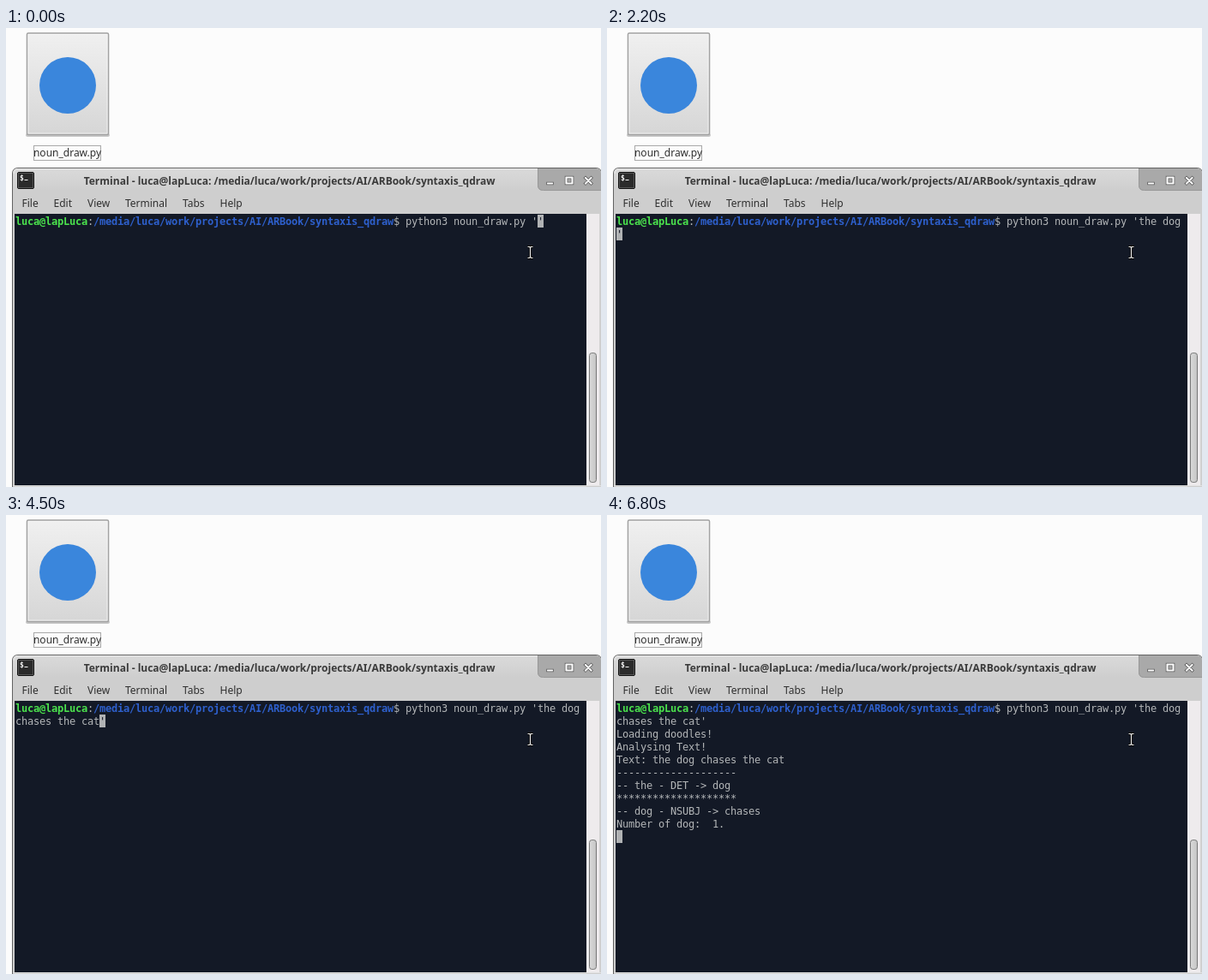
Recreate the animation shown at these times as an HTML page. Size 694x536 px, loop 8 s.

```html
<!DOCTYPE html>
<html lang="en">
<head>
<meta charset="utf-8">
<title>Terminal session</title>
<style>
  html, body { margin: 0; width: 100%; height: 100%; overflow: hidden; background: #fcfcfc; }
  svg { display: block; }
  .ui { font: 12px "Noto Sans", "Open Sans", sans-serif; fill: #303030; }
  .title { font-weight: bold; fill: #3a3a3a; }
  #screen { font: 12px "DejaVu Sans Mono", "Liberation Mono", monospace; fill: #b3b6b8; }
  #screen .user { font-weight: bold; fill: #4be34d; }
  #screen .path { font-weight: bold; fill: #2e60cd; }
  #screen .under { fill: #131926; }
</style>
</head>
<body>
<svg width="694" height="536" viewBox="0 0 694 536">
  <defs>
    <linearGradient id="paper" x1="0" y1="0" x2="0" y2="1">
      <stop offset="0" stop-color="#f0f0f0"/>
      <stop offset="1" stop-color="#d6d6d6"/>
    </linearGradient>
    <linearGradient id="bar" x1="0" y1="0" x2="0" y2="1">
      <stop offset="0" stop-color="#dadada"/>
      <stop offset="1" stop-color="#cecece"/>
    </linearGradient>
    <linearGradient id="thumb">
      <stop offset="0" stop-color="#dadada"/>
      <stop offset="1" stop-color="#c4c4c4"/>
    </linearGradient>
  </defs>

  <!-- desktop file -->
  <rect x="23" y="123" width="98" height="4" rx="2" fill="#a0a0a0" opacity=".6"/>
  <rect x="24.5" y="6" width="95" height="118.5" rx="1.5" fill="url(#paper)" stroke="#a2a2a2" stroke-width="1.6"/>
  <rect x="26" y="7.5" width="92" height="115.5" fill="none" stroke="#f8f8f8" opacity=".7"/>
  <circle cx="72" cy="67" r="33" fill="#3a86dc"/>
  <text class="ui" x="71.5" y="150" text-anchor="middle">noun_draw.py</text>
  <rect x="32.5" y="137.5" width="78" height="17" fill="none" stroke="#555" stroke-dasharray="1 1"/>

  <!-- window frame -->
  <path d="M7.5 540V170q0-6.500 6.500-6.500H688q6.500 0 6.500 6.500V540Z" fill="#cecece" stroke="#626262"/>
  <path d="M8 190V170q0-6 6-6H688q6 0 6 6v20Z" fill="url(#bar)"/>
  <path d="M9 170q0-5.500 5.500-5.500H620" fill="none" stroke="#ececec"/>
  <path d="M620 164H688q6 0 6 6v19.500H626q-6 0-6-6Z" fill="#a9a9a9"/>
  <path d="M620.500 164v19.500q0 6 6 6H694" fill="none" stroke="#979797"/>
  <g fill="none" stroke-linecap="square">
    <g stroke="#626262" stroke-width="3.600">
      <path id="glyphs" d="M632 181.500h5M653.500 174.500h7v7h-7ZM676 175l6.500 6.500M682.500 175l-6.500 6.500"/>
    </g>
    <use href="#glyphs" stroke="#fff" stroke-width="1.600"/>
    <path d="M632 181.500h5M653.500 174.500h7v7h-7ZM676 175l6.500 6.500M682.500 175l-6.500 6.500" stroke="#fff" stroke-width="1.700"/>
  </g>
  <rect x="13.500" y="168.500" width="19" height="19" rx="1.500" fill="#2b2b2b" stroke="#111"/>
  <rect x="14.500" y="169.500" width="17" height="17" fill="none" stroke="#555"/>
  <text x="16" y="178" font-family="DejaVu Sans Mono, monospace" font-size="8" font-weight="bold" fill="#f4f4f4">$</text>
  <path d="M21.500 177.500h4" stroke="#f4f4f4"/>
  <text class="ui title" x="570.500" y="183" text-anchor="end">Terminal - luca@lapLuca: /media/luca/work/projects/AI/ARBook/syntaxis_qdraw</text>
  <g class="ui">
    <text x="18.500" y="209">File</text>
    <text x="55.500" y="209">Edit</text>
    <text x="95" y="209">View</text>
    <text x="139" y="209">Terminal</text>
    <text x="206" y="209">Tabs</text>
    <text x="249.500" y="209">Help</text>
  </g>

  <!-- terminal body and scrollbar -->
  <rect x="10" y="217" width="667" height="317" fill="#131926"/>
  <rect x="677" y="217" width="15" height="317" fill="#eeebed"/>
  <path d="M692.500 217V534" stroke="#d2d2d2"/>
  <path d="M8 534.500H694" stroke="#e2e2e2"/>
  <rect x="680.500" y="379.500" width="8" height="151" rx="3" fill="url(#thumb)" stroke="#777"/>

  <g id="screen"></g>

  <!-- mouse pointer -->
  <g fill="none">
    <path d="M608.500 255.500h2l1 1 1-1h2M611.500 256v12M608.500 268.500h2l1-1 1 1h2" stroke="#000" stroke-width="3"/>
    <path d="M608.500 255.500h2l1 1 1-1h2M611.500 256v12M608.500 268.500h2l1-1 1 1h2" stroke="#eee" stroke-width="1.200"/>
  </g>
</svg>

<script>
const LOOP = 8000, COLS = 95, CELL_W = 7, CELL_H = 15, LEFT = 11, TOP = 218;
const USER = 'luca@lapLuca';
const PATH = '/media/luca/work/projects/AI/ARBook/syntaxis_qdraw';
const COMMAND = "$ python3 noun_draw.py '";
const SENTENCE = 'the dog chases the cat';

// [time, letters of the sentence typed so far]
const KEYS = [[0, 0], [300, 1], [400, 2], [600, 3], [800, 4], [1800, 5], [1900, 6],
  [2000, 7], [2200, 8], [3100, 12], [3200, 13], [3400, 15], [3500, 16],
  [3700, 18], [3900, 19], [4100, 21], [4500, 22]];

// [time, lines of output visible]
const PRINTS = [[0, -1], [5400, 0], [6300, 2], [6800, 8]];
const OUTPUT = [
  'Loading doodles!',
  'Analysing Text!',
  'Text: ' + SENTENCE,
  '-'.repeat(20),
  '-- the - DET -> dog',
  '*'.repeat(20),
  '-- dog - NSUBJ -> chases',
  'Number of dog:  1.'
];

const screen = document.getElementById('screen');
const valueAt = (steps, t) => steps.filter(([at]) => at <= t).pop()[1];

function add(tag, attrs, content = '') {
  const el = document.createElementNS('http://www.w3.org/2000/svg', tag);
  for (const key in attrs) el.setAttribute(key, attrs[key]);
  el.textContent = content;
  screen.append(el);
}

// Writes text on the character grid, wrapping at the last column; returns the next cell.
function write(text, cell, style = '') {
  const rows = {};
  [...text].forEach((char, i) => {
    if (char === ' ') return;
    const row = Math.floor((cell + i) / COLS);
    const line = rows[row] ||= { chars: '', xs: [] };
    line.chars += char;
    line.xs.push(LEFT + (cell + i) % COLS * CELL_W);
  });
  for (const row in rows) {
    add('text', { x: rows[row].xs.join(' '), y: TOP + row * CELL_H + 12, class: style }, rows[row].chars);
  }
  return cell + text.length;
}

function drawCursor(cell) {
  add('rect', {
    x: LEFT + cell % COLS * CELL_W, y: TOP + Math.floor(cell / COLS) * CELL_H,
    width: CELL_W, height: CELL_H, fill: '#b0b2b4'
  });
}

function draw(typed, printed) {
  screen.replaceChildren();
  let cell = write(USER, 0, 'user');
  cell = write(':', cell);
  cell = write(PATH, cell, 'path');
  cell = write(COMMAND + SENTENCE.slice(0, typed), cell);
  if (printed < 0) {
    drawCursor(cell);
    write("'", cell, 'under');
    return;
  }
  write("'", cell);
  OUTPUT.slice(0, printed).forEach((line, i) => write(line, (i + 2) * COLS));
  drawCursor((printed + 2) * COLS);
}

let shown = '';
function update(now) {
  const t = now % LOOP;
  const state = [valueAt(KEYS, t), valueAt(PRINTS, t)];
  if (String(state) !== shown) {
    shown = String(state);
    draw(...state);
  }
}

const start = performance.now();
function tick() {
  update(performance.now() - start);
  requestAnimationFrame(tick);
}
tick();
</script>
</body>
</html>
```
